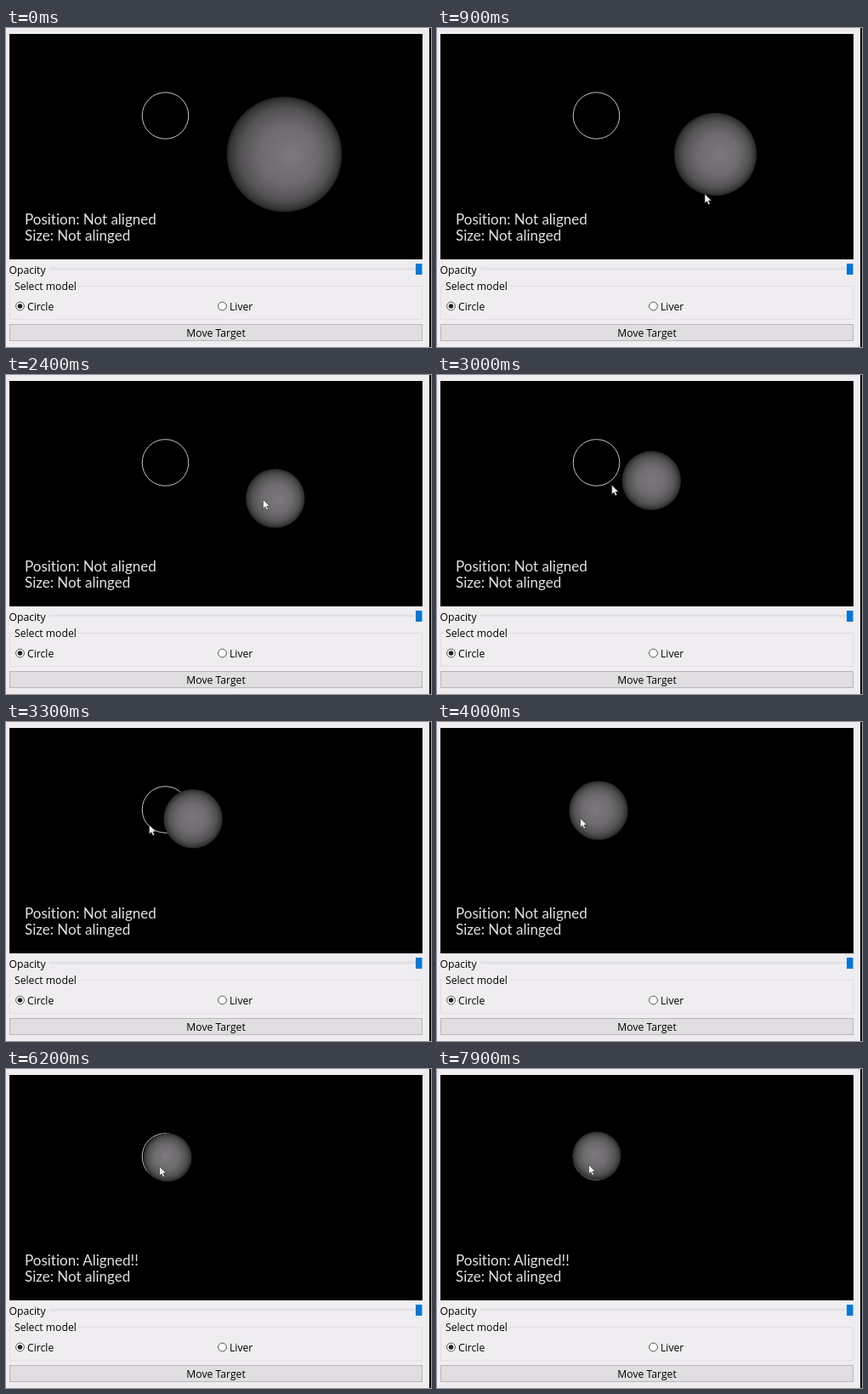
Write an HTML page that moves like this. It is 500 by 375 pixels and loops after 8000 ms.

```html
<!DOCTYPE html>
<html lang="en">
<head>
<meta charset="utf-8">
<style>
  html, body { margin: 0; width: 100%; height: 100%; overflow: hidden; background: #efedf0; }
  svg { display: block; width: 100vw; height: 100vh; }
  .ui { font: 12.2px "Open Sans", "Noto Sans", sans-serif; fill: #000; }
  .view { font: 17px Lato, sans-serif; font-variant-ligatures: none; fill: #e2e2e2; }
</style>
</head>
<body>
<svg viewBox="0 0 500 375">
  <defs>
    <radialGradient id="shade">
      <stop offset="0" stop-color="#7b797b"/>
      <stop offset=".5" stop-color="#6d6b6d"/>
      <stop offset=".8" stop-color="#535153"/>
      <stop offset=".95" stop-color="#353435"/>
      <stop offset="1" stop-color="#202020"/>
    </radialGradient>
  </defs>
  <rect width="500" height="375" fill="#efedf0"/>
  <rect x="498" y="0" width="2" height="375"/>

  <rect x="4" y="7" width="486" height="265"/>
  <circle cx="187.5" cy="103" r="27.3" fill="none" stroke="#c4c4c4"/>
  <circle id="ball" fill="url(#shade)"/>
  <g class="view">
    <text id="position" x="22" y="231"></text>
    <text x="22" y="250">Size: Not alinged</text>
  </g>
  <path id="cursor" d="M0 0V11L2.5 8.7L4.3 12.6L6.2 11.8L4.5 8H8Z" fill="#f0f0f0" stroke="#222" stroke-width=".6"/>

  <rect x="51" y="281.5" width="431" height="3" fill="#e2e1e4"/>
  <rect x="482" y="277" width="7.5" height="13" fill="#0078d7"/>
  <rect x="4.5" y="303.5" width="485" height="39" fill="none" stroke="#e0dee1"/>
  <rect x="8" y="298" width="77" height="12" fill="#efedf0"/>
  <g fill="#fff" stroke="#555">
    <circle cx="16.5" cy="327" r="4.9"/>
    <circle cx="254.5" cy="327" r="4.9"/>
  </g>
  <circle cx="16.5" cy="327" r="2.8" fill="#222"/>
  <rect x="4.5" y="348.5" width="485" height="19" fill="#e0dee1" stroke="#b8b6b9"/>
  <g class="ui">
    <text x="3.5" y="289">Opacity</text>
    <text x="10" y="308">Select model</text>
    <text x="25" y="332">Circle</text>
    <text x="263" y="332">Liver</text>
    <text x="247" y="362.5" text-anchor="middle">Move Target</text>
  </g>
</svg>
<script>
const LOOP = 8000, TICK = 100;
const $ = id => document.getElementById(id);
const [ball, cursor, label, shade] = ["ball", "cursor", "position", "shade"].map($);

function set(el, attrs) {
  for (const name in attrs) el.setAttribute(name, attrs[name]);
}

function draw(now) {
  const t = Math.floor((now % LOOP) / TICK) * TICK;
  const ramp = (from, to) => Math.min(1, Math.max(0, (t - from) / (to - from)));

  // Zoom out, drag to the ring, zoom again, then a small wobble
  const r = 67.8 - 19.1 * ramp(0, 900) - 13.9 * ramp(900, 2350) - 6.3 * ramp(4400, 5700);
  const drag = ramp(2300, 3580), end = ramp(6800, 7900);
  const dx = -2 * ramp(6800, 7100);
  const dy = -2 * end - 2.5 * Math.sin(2 * Math.PI * end);
  const x = 327.5 - 137.5 * drag + dx;
  const y = 148.5 - 44.5 * drag + dy;
  set(ball, { cx: x, cy: y, r });

  // Perspective pushes the highlight away from the middle of the view
  set(shade, { fx: 0.5 + (x - 247) / 1100, fy: 0.5 + (y - 139) / 1100 });

  // The ball lags behind the pointer
  const px = 315 + 3.5 * ramp(900, 1600) - 150 * ramp(2300, 3230) + 12 * ramp(5800, 6200) + dx;
  const py = 195 - 46 * ramp(900, 1600) - 36 * drag
    + 13.5 * ramp(4400, 5800) - 12 * ramp(5800, 6200) + dy;
  set(cursor, {
    transform: `translate(${px} ${py})`,
    visibility: t < 500 ? "hidden" : "visible"
  });

  label.textContent = "Position: " + (t < 4200 ? "Not aligned" : "Aligned!!");
}

const start = performance.now();
function frame() {
  draw(performance.now() - start);
  requestAnimationFrame(frame);
}
frame();
</script>
</body>
</html>
```
